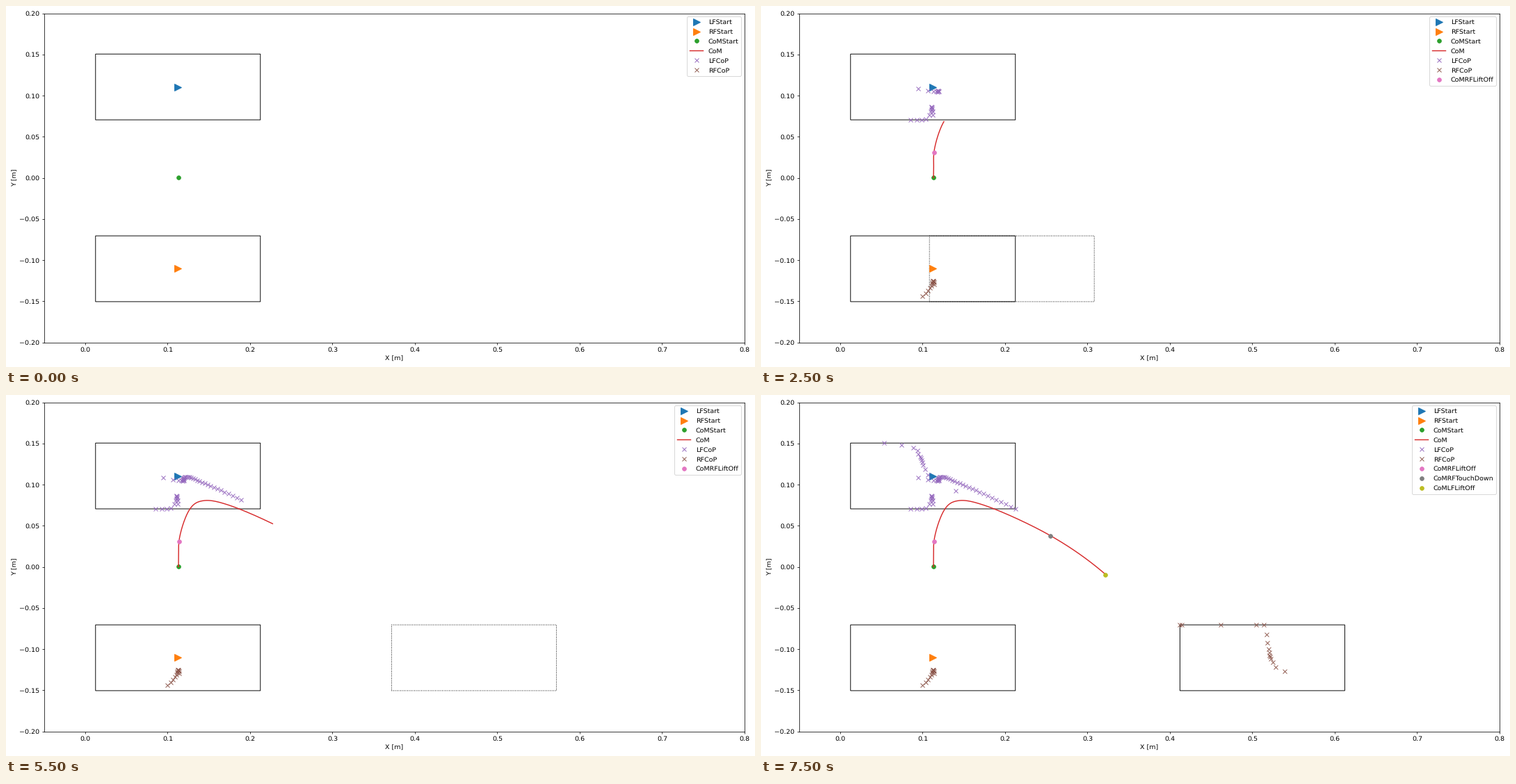
Write a matplotlib script that moves like this. It is 1077x520 px and loops after 8 s.

```python
import numpy as np
import matplotlib.pyplot as plt
from matplotlib.animation import FuncAnimation
from matplotlib.patches import Rectangle

plt.rcParams.update({"font.family": "DejaVu Sans", "font.size": 10,
                     "text.hinting": "none", "legend.labelspacing": 0.55})

W, H, DPI = 1077, 520, 68
LEFT, TOP, SCALE = 54.7, 10.55, 1185.0       # axes corner and pixels per metre
X_LIM, Y_LIM = (-0.05, 0.8), (-0.2, 0.2)
FRAMES, STEP_MS = 16, 500
LIFT_R, LAND_R, LIFT_L = 3, 12, 15           # gait events, in animation steps
FOOT = np.array([0.2, 0.08])
LEFT_FOOT = np.array([0.1125, 0.1105])       # foot centres
RIGHT_FOOT = LEFT_FOOT * (1, -1)
STRIDE = 0.3997


def smooth_path(knots, t):
    """Cubic Hermite curve through (time, x, y) knots in stage pixels."""
    knots = np.array(knots, float)
    time = knots[:, 0]
    p = np.column_stack([X_LIM[0] + (knots[:, 1] - LEFT) / SCALE,
                         Y_LIM[1] - (knots[:, 2] - TOP) / SCALE])
    v = np.gradient(p, time, axis=0, edge_order=2)
    i = np.clip(np.searchsorted(time, t, "right") - 1, 0, len(time) - 2)
    h = (time[i + 1] - time[i])[:, None]
    u = (t - time[i])[:, None] / h
    return (p[i] + (p[i + 1] - p[i]) * u * u * (3 - 2 * u)
            + h * u * (1 - u) * (v[i] * (1 - u) - v[i + 1] * u))


def com(t):
    """Centre of mass at the given steps."""
    return smooth_path([(0, 248, 247.4), (2, 248.3, 232), (3, 248.7, 211),
                        (5, 263, 166.5), (7, 284, 152.2), (9, 320, 158.5),
                        (12, 416, 202.5), (15, 495.5, 258.5)], t)


def pressure(start, end, centre, knots):
    """One support phase: one sample per knot unit, kept inside the sole."""
    pts = smooth_path(knots, np.arange(knots[-1][0] + 1))
    return start, end, np.clip(pts, centre - FOOT / 2, centre + FOOT / 2)


def logged(phases, n):
    """Pressure points recorded up to step n."""
    parts = []
    for start, end, pts in phases:
        done = np.clip((n - start) / (end - start), 0, 1)
        parts.append(pts[:int(round(done * len(pts)))])
    return np.vstack(parts)


def swing(n):
    """Centre of the right foot while it travels."""
    u = (n - LIFT_R) / (LAND_R - LIFT_R)
    return RIGHT_FOOT + (STRIDE * (u + 0.1 * u * (1 - u)), 0)


left_cop = [
    pressure(0, LIFT_R, LEFT_FOOT,
             [(0, 247, 157), (4, 245.3, 145), (8, 241.5, 157),
              (12, 215, 185)]),
    pressure(LIFT_R, LAND_R, LEFT_FOOT,
             [(0, 226, 118.5), (1, 240, 121.5), (4, 254, 123.5),
              (8, 254.5, 121.5), (16, 261.5, 118), (25, 290, 129),
              (38, 366, 164)]),
    pressure(LAND_R, LIFT_L, LEFT_FOOT,
             [(0, 280, 137.5), (1, 240, 115), (2, 236, 107),
              (8, 226.5, 85), (10, 219, 76), (12, 177, 69)])]
right_cop = [
    pressure(0, LIFT_R, RIGHT_FOOT,
             [(0, 249.5, 401), (4, 247, 395.5), (9, 243, 406),
              (12, 232.5, 418)]),
    pressure(LAND_R, LIFT_L, swing(LAND_R),
             [(0, 753.5, 398), (1, 740, 391.5), (2, 736, 385),
              (8, 728.5, 357), (10, 723, 331), (11, 712.5, 316),
              (12, 661, 300), (14, 545, 270)])]

fig = plt.figure(figsize=(W / DPI, H / DPI), dpi=DPI, facecolor="white")
ax_w = (X_LIM[1] - X_LIM[0]) * SCALE
ax_h = (Y_LIM[1] - Y_LIM[0]) * SCALE
ax = fig.add_axes([LEFT / W, 1 - (TOP + ax_h) / H, ax_w / W, ax_h / H])
ax.set(xlim=X_LIM, ylim=Y_LIM, xlabel="X [m]",
       xticks=np.arange(9) / 10, yticks=np.arange(-4, 5) / 20)
ax.set_ylabel("Y [m]", labelpad=1.5)


def sole(centre, style="-"):
    return ax.add_patch(Rectangle(centre - FOOT / 2, *FOOT, fill=False,
                                  ec="black", lw=1, ls=style, snap=False))


def mark(label, color, xy, marker="o", size=6):
    return ax.plot([xy[0]], [xy[1]], marker, ms=size, color=color,
                   label=label)[0]


sole(LEFT_FOOT)
sole(RIGHT_FOOT)
moving = sole(RIGHT_FOOT, ":")
landed = sole(swing(LAND_R))

dots = com(np.array([0, LIFT_R, LAND_R, LIFT_L]))
start_l = mark("LFStart", "C0", LEFT_FOOT, ">", 10)
start_r = mark("RFStart", "C1", RIGHT_FOOT, ">", 10)
start_com = mark("CoMStart", "C2", dots[0])
com_line, = ax.plot([], [], color="C3", label="CoM")
cop_l, = ax.plot([], [], "x", color="C4", label="LFCoP")
cop_r, = ax.plot([], [], "x", color="C5", label="RFCoP")
always = [start_l, start_r, start_com, com_line, cop_l, cop_r]
events = [(LIFT_R, mark("CoMRFLiftOff", "C6", dots[1])),
          (LAND_R, mark("CoMRFTouchDown", "C7", dots[2])),
          (LIFT_L, mark("CoMLFLiftOff", "C8", dots[3]))]


def update(n):
    com_line.set_data(*com(np.linspace(0, n, 20 * n + 1)).T)
    cop_l.set_data(*logged(left_cop, n).T)
    cop_r.set_data(*logged(right_cop, n).T)
    moving.set_xy(swing(n) - FOOT / 2)
    moving.set_visible(LIFT_R < n < LAND_R)
    landed.set_visible(n >= LAND_R)
    for step, dot in events:
        dot.set_visible(n >= step)
    shown = [dot for step, dot in events if n >= step]
    ax.legend(handles=always + shown, loc="upper right")
    return []


anim = FuncAnimation(fig, update, frames=FRAMES, interval=STEP_MS,
                     init_func=lambda: update(0), repeat=True,
                     repeat_delay=0, blit=False)
plt.show()
```
